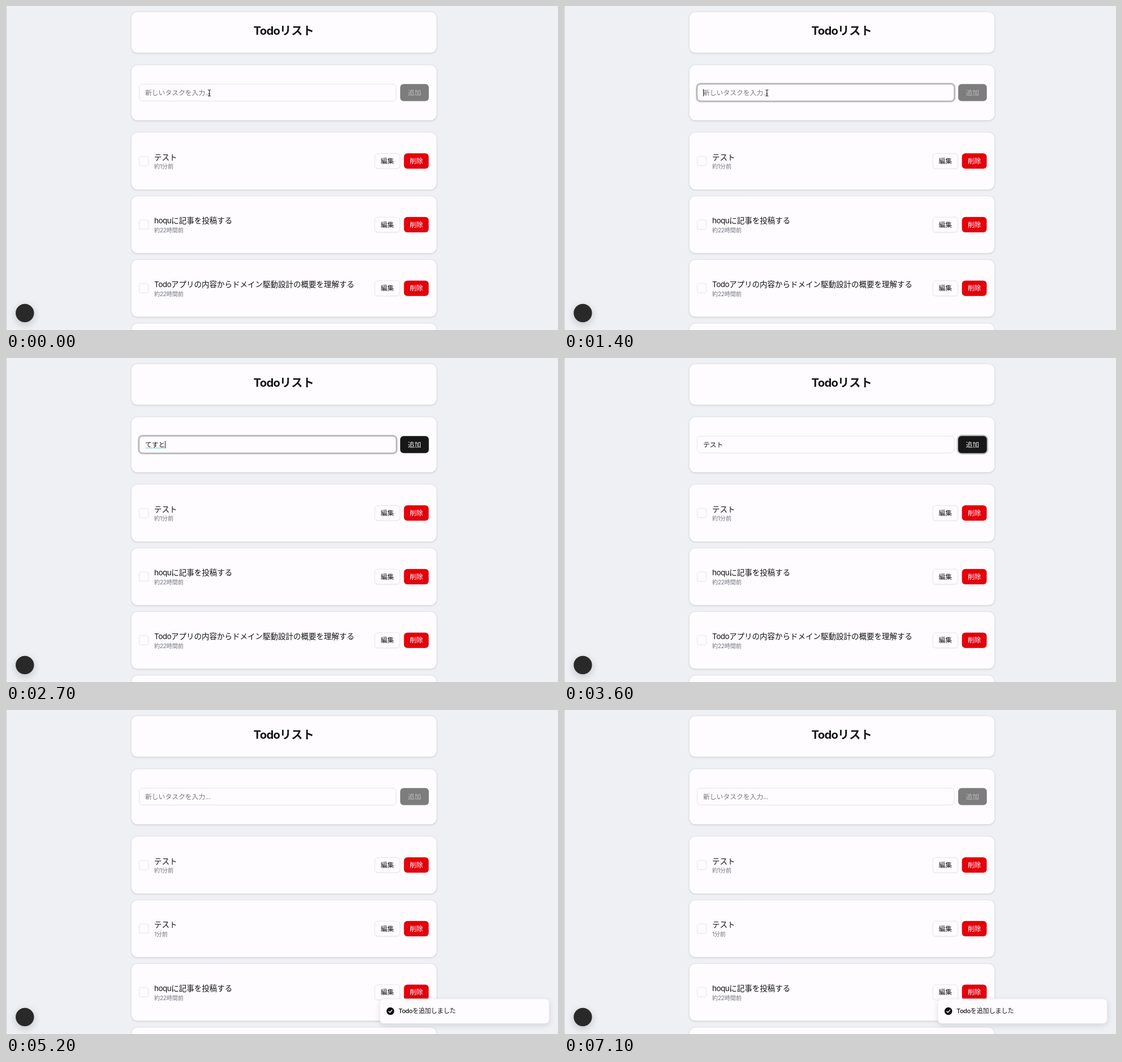
An HTML page with a canvas that plays this animation: 976 px wide and 574 px high, repeating every 7.2 s.

```html
<!DOCTYPE html>
<html lang="ja">
<head>
<meta charset="utf-8">
<title>Todoリスト</title>
<style>
  html, body { margin: 0; width: 100%; height: 100%; overflow: hidden; background: #eef0f4; }
  canvas { display: block; width: 976px; height: 574px; }
</style>
</head>
<body>
<canvas id="stage" width="976" height="574"></canvas>
<script>
const ctx = document.getElementById('stage').getContext('2d');
const LOOP = 7200, STEP = 100;
const FOCUS = 850, TYPE = 1750, TAB = 3050, ADDED = 3800, TOAST = 3835;
const CARD = '#fefcfe', LINE = '#e3e3e7', INK = '#171717', MUTED = '#737780';
const FACE = 'Inter, "Noto Sans CJK JP", "Noto Sans CJK", sans-serif';

// Input contents over time: [start, text, still composing]
const TYPING = [
  [TYPE, 'ｔ', true], [1900, 'て', true], [2050, 'てｓ', true], [2200, 'てす', true],
  [2350, 'てすｔ', true], [2450, 'てすと', true], [2800, 'テスト', true], [2950, 'テスト', false]
];
const OLD_ROWS = [
  ['テスト', '約1分前'],
  ['hoquに記事を投稿する', '約22時間前'],
  ['Todoアプリの内容からドメイン駆動設計の概要を理解する', '約22時間前'],
  ['', '']
];
const NEW_ROWS = [OLD_ROWS[0], ['テスト', '1分前'], OLD_ROWS[1], OLD_ROWS[2]];

const clamp = v => Math.max(0, Math.min(1, v));
const ramp = (t, start, length = 150) => clamp((t - start) / length);

// CSS "ease": cubic-bezier(.25, .1, .25, 1)
function ease(x) {
  let lo = 0, hi = 1;
  const curve = (u, a, b) => 3 * u * (1 - u) ** 2 * a + 3 * u * u * (1 - u) * b + u ** 3;
  for (let i = 0; i < 20; i++) {
    const mid = (lo + hi) / 2;
    if (curve(mid, .25, .25) < x) lo = mid; else hi = mid;
  }
  return curve(hi, .1, 1);
}

function box(x, y, w, h, r, fill, stroke, lineWidth = 1) {
  ctx.beginPath();
  ctx.roundRect(x, y, w, h, r);
  if (fill) { ctx.fillStyle = fill; ctx.fill(); }
  if (stroke) {
    ctx.shadowColor = 'transparent';
    ctx.strokeStyle = stroke;
    ctx.lineWidth = lineWidth;
    ctx.stroke();
  }
}

function shadowed(blur, dy, alpha, draw) {
  ctx.save();
  ctx.shadowColor = `rgba(0,0,0,${alpha})`;
  ctx.shadowBlur = blur;
  ctx.shadowOffsetY = dy;
  draw();
  ctx.restore();
}

// Latin runs are set slightly tighter than the Japanese ones.
function text(str, x, y, size, color, weight = 400, centered = false) {
  ctx.font = `${weight} ${size}px ${FACE}`;
  ctx.fillStyle = color;
  const runs = (str.match(/[\x20-\x7e]+|[^\x20-\x7e]+/g) || []).map(s => {
    const spacing = s.charCodeAt(0) < 127 ? -size * .038 + 'px' : '0px';
    ctx.letterSpacing = spacing;
    return { s, spacing, width: ctx.measureText(s).width };
  });
  const total = runs.reduce((sum, r) => sum + r.width, 0);
  if (centered) x -= total / 2;
  for (const r of runs) {
    ctx.letterSpacing = r.spacing;
    ctx.fillText(r.s, x, y);
    x += r.width;
  }
  ctx.letterSpacing = '0px';
  return total;
}

function card(y, h) {
  shadowed(3, 1, .16, () => box(221.5, y, 540, h, 11, CARD, LINE));
}

function ring(x, y, w, h, r, k) {
  if (k <= 0) return;
  ctx.save();
  ctx.globalAlpha = k;
  box(x - 1.2, y - 1.2, w + 2.4, h + 2.4, r + 1.2, null, '#c9c9cc', 2.6);
  box(x, y, w, h, r, null, '#9b9b9d');
  ctx.restore();
}

function row(y, [title, age]) {
  card(y, 101.5);
  box(235.5, y + 42.5, 16.5, 16.5, 3.5, CARD, LINE);
  text(title, 262, y + 48.8, 13.5, '#141414');
  text(age, 262, y + 64.6, 10.1, MUTED);
  shadowed(1.5, 1, .06, () => box(652, y + 37.5, 44.5, 26.8, 5.5, CARD, LINE));
  text('編集', 674.2, y + 55.1, 11.8, INK, 500, true);
  box(703.6, y + 37.2, 43.8, 27.2, 6, '#e3000b');
  text('削除', 725.5, y + 55.1, 11.8, '#fff', 500, true);
}

function pointer(t) {
  const x = 359.5 - .7 * ramp(t, 300, 500), y = 154;
  ctx.beginPath();
  for (const s of [-1, 1]) {
    ctx.moveTo(x - 2.5, y + s * 5.5);
    ctx.quadraticCurveTo(x, y + s * 5.5, x, y + s * 4);
    ctx.quadraticCurveTo(x, y + s * 5.5, x + 2.5, y + s * 5.5);
  }
  ctx.moveTo(x, y - 4.5);
  ctx.lineTo(x, y + 4.5);
  ctx.moveTo(x - 1.5, y + 1.5);
  ctx.lineTo(x + 1.5, y + 1.5);
  for (const [color, width] of [[CARD, 3], ['#222', 1.1]]) {
    ctx.strokeStyle = color;
    ctx.lineWidth = width;
    ctx.stroke();
  }
}

function form(t) {
  card(104.5, 98.2);
  const focus = ramp(t, FOCUS) - ramp(t, TAB);
  box(235.5, 138.5, 454.5, 29.8, 6, CARD, LINE);
  ring(235.5, 138.5, 454.5, 29.8, 6, focus);

  const state = t < ADDED && TYPING.filter(k => k[0] <= t).pop();
  let end = 246.5;
  if (state) {
    const width = text(state[1], 246, 157.8, 11.8, INK);
    end = 246 + width;
    if (state[2]) {
      ctx.save();
      ctx.setLineDash([2, 1]);
      ctx.strokeStyle = '#35a9bd';
      ctx.lineWidth = 1;
      ctx.beginPath();
      ctx.moveTo(247, 159.5);
      ctx.lineTo(end - 1, 159.5);
      ctx.stroke();
      ctx.restore();
    }
  } else {
    text('新しいタスクを入力...', 246, 157.8, 11.8, '#777');
  }
  if (t >= FOCUS && t < TAB) {
    ctx.fillStyle = '#222';
    ctx.fillRect(Math.floor(end), 147, 1, 13);
  }
  if (t < TYPE) pointer(t);

  const on = ramp(t, TYPE) - ramp(t, ADDED);
  ring(697, 138.2, 50.6, 30.3, 6, ramp(t, TAB) - ramp(t, ADDED - 50));
  ctx.save();
  ctx.globalAlpha = .55 + .45 * on;
  box(697, 138.2, 50.6, 30.3, 6, INK);
  text('追加', 722.3, 157.8, 11.8, '#eee', 500, true);
  ctx.restore();
}

function toast(t) {
  const p = ease(ramp(t, TOAST, 400));
  if (t < TOAST) return;
  ctx.save();
  ctx.globalAlpha = p;
  ctx.translate(0, 44 * (1 - p));
  shadowed(11, 3.4, .12, () => box(661, 511.8, 299.3, 43.4, 6.5, CARD, '#ebebee'));
  ctx.fillStyle = '#0c0c0c';
  ctx.beginPath();
  ctx.arc(679.6, 533.5, 6.8, 0, 7);
  ctx.fill();
  ctx.strokeStyle = '#fff';
  ctx.lineWidth = 1.4;
  ctx.lineCap = ctx.lineJoin = 'round';
  ctx.beginPath();
  ctx.moveTo(676.8, 533.9);
  ctx.lineTo(678.8, 535.8);
  ctx.lineTo(682.5, 531.6);
  ctx.stroke();
  text('Todoを追加しました', 694, 537.4, 10.97, INK, 500);
  ctx.restore();
}

function badge() {
  shadowed(14, 4, .2, () => {
    ctx.fillStyle = '#292929';
    ctx.beginPath();
    ctx.arc(33.3, 544, 16.2, 0, 7);
    ctx.fill();
  });
}

function draw(t) {
  ctx.fillStyle = '#eef0f4';
  ctx.fillRect(0, 0, 976, 574);
  ctx.fillStyle = '#d3d5d9';
  ctx.fillRect(0, 0, 1.3, 574);
  card(10.3, 72.8);
  text('Todoリスト', 491.2, 51.3, 20.25, '#141414', 700, true);
  form(t);
  (t < ADDED ? OLD_ROWS : NEW_ROWS).forEach((item, i) => row(223.8 + 112.75 * i, item));
  badge();
  toast(t);
}

function tick() {
  const t = performance.now() % LOOP;
  draw(Math.floor(t / STEP) * STEP);
  requestAnimationFrame(tick);
}
tick();
</script>
</body>
</html>
```
